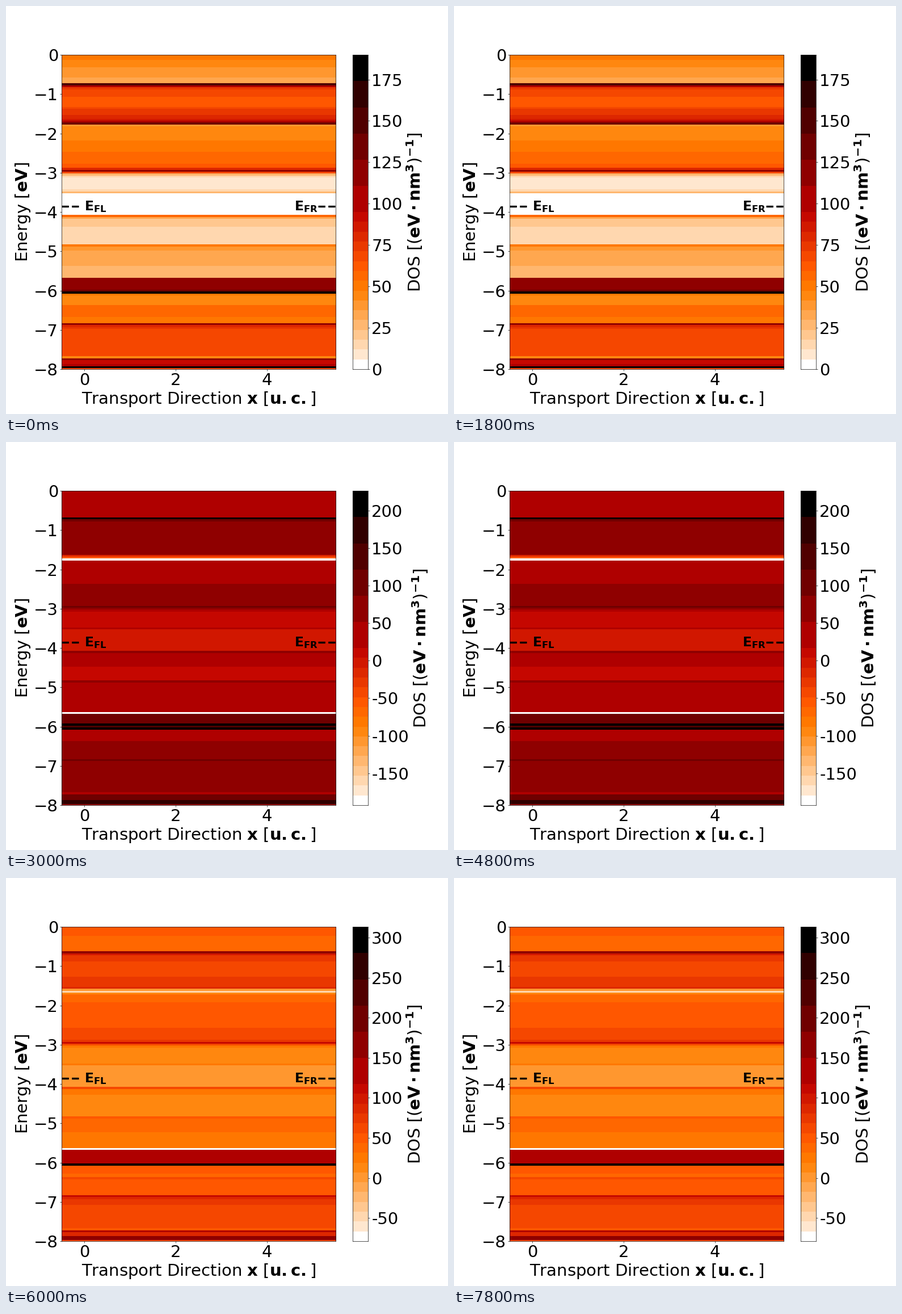
A matplotlib script that plays this animation: 779x719 px, repeating every 9000 ms.

```python
import numpy as np
import matplotlib.pyplot as plt
from matplotlib.animation import FuncAnimation
from matplotlib.colors import ListedColormap

W, H, DPI = 779, 719, 60
LIGHT, DARK = 16, 6  # colour steps in the two halves of the scale
ROWS = 161           # energy rows of 0.05 eV

plt.rcParams.update({"font.family": "DejaVu Sans", "font.size": 35})


def heat(t):
    """Black (0) to red, orange and white (1)."""
    return tuple(np.clip([1.5 * t, 2 * t - 1, 4 * t - 3], 0, 1))


light = [heat(1 - (j + 0.5) / (2 * LIGHT)) for j in range(LIGHT)]
dark = [heat(0.5 - (j + 0.5) / (2 * DARK)) for j in range(DARK)]
light[0], dark[-1] = (1, 1, 1), (0, 0, 0)
cmap = ListedColormap(light + dark)
steps = LIGHT + DARK
edges = np.concatenate([np.linspace(0, 0.5, LIGHT + 1),
                        np.linspace(0.5, 1, DARK + 1)[1:]])

# Subbands: first row, DOS at top and bottom, edge peaks at top and bottom
subbands = [
    (0, 50, 33, 0, 0),
    (15, 72, 60, 80, 0),
    (27, 70, 88, 0, 42),
    (36, 41, 62, 0, 55),
    (60, 8, 9, 60, 18),
    (71, 0, 0, 0, 0),
    (82, 20, 14, 38, 0),
    (97, 36, 26, 16, 0),
    (114, 118, 118, 0, 64),
    (122, 48, 42, 0, 0),
    (128, 56, 52, 0, 0),
    (137, 68, 68, 48, 0),
    (154, 44, 44, 0, 0),
    (155, 76, 78, 42, 102),
    (160, 68, 68, 0, 0),
]

# Range of the colour scale, tick spacing, upward shift, single-row spikes
scenes = [
    (0, 189.85, 25, 0, {}),
    (-192.6, 226.3, 50, 1,
     {14: 215, 33: -15, 34: -55, 35: -192, 113: -192, 119: 215, 121: 215,
      158: 165}),
    (-78.9, 313.2, 50, 2.5,
     {32: 5, 33: -45, 34: 12, 113: -78, 121: 300, 158: 165}),
]


def density(shift, spikes):
    """DOS per row; the shift fades out towards -3 eV."""
    starts = [round(s[0] - shift * max(0, 1 - s[0] / 60)) for s in subbands]
    starts[0] = 0
    dos = np.zeros(ROWS)
    for (_, top, bottom, head, tail), a, b in zip(subbands, starts,
                                                  starts[1:] + [ROWS]):
        d = np.arange(b - a)
        dos[a:b] = (np.linspace(top, bottom, b - a)
                    + head * np.exp(-1.2 * d)
                    + tail * np.exp(-1.2 * d[::-1]))
    for row, value in spikes.items():
        dos[row] = value
    return dos


def column(low, high, gap, shift, spikes):
    t = (density(shift, spikes) - low) / (high - low)
    return np.searchsorted(edges[1:-1], t, side="right")[:, None]


columns = [column(*scene) for scene in scenes]

fig = plt.figure(figsize=((W + 1e-6) / DPI, (H + 1e-6) / DPI), dpi=DPI,
                 facecolor="white")
ax = fig.add_axes([98 / W, 0.11, 483 / W, 0.77])
cax = fig.add_axes([611 / W, 0.11, 27.4 / W, 0.77])
colours = dict(cmap=cmap, vmin=-0.5, vmax=steps - 0.5)

image = ax.imshow(columns[0], extent=(-0.5, 5.5, -8.025, 0.025),
                  aspect="auto", interpolation="nearest", **colours)
ax.set(xlim=(-0.5, 5.5), ylim=(-8, 0), xticks=[0, 2, 4],
       yticks=range(-8, 1))
ax.set_xlabel(r"Transport Direction $\mathbf{x}$ [$\mathbf{u.c.}$]")
ax.set_ylabel(r"Energy [$\mathbf{eV}$]")

# Fermi levels of both contacts
for x0, x1 in [(-0.5, -0.11), (5.12, 5.5)]:
    ax.plot([x0, x1], [-3.85, -3.85], "k--", lw=4)
ax.text(0, -3.955, r"$\mathbf{E_{FL}}$", size=28)
ax.text(5.11, -3.955, r"$\mathbf{E_{FR}}$", size=28, ha="right")

cax.pcolormesh([0, 1], edges, np.arange(steps)[:, None],
               transform=cax.transAxes, **colours)
cax.set(xlim=(0, 1), xticks=[])
cax.yaxis.tick_right()
cax.yaxis.set_label_position("right")
cax.set_ylabel(r"DOS [$(\mathbf{eV\cdot nm^3})^{\mathbf{-1}}$]")


def update(i):
    low, high, gap = scenes[i][:3]
    image.set_data(columns[i])
    ticks = np.arange(np.ceil(low / gap), high / gap, dtype=int) * gap
    cax.set_yticks(ticks, [str(t) for t in ticks])
    cax.set_ylim(low, high)
    return [image]


anim = FuncAnimation(fig, update, frames=len(scenes), interval=3000,
                     repeat=True, repeat_delay=0, blit=False)
plt.show()
```
